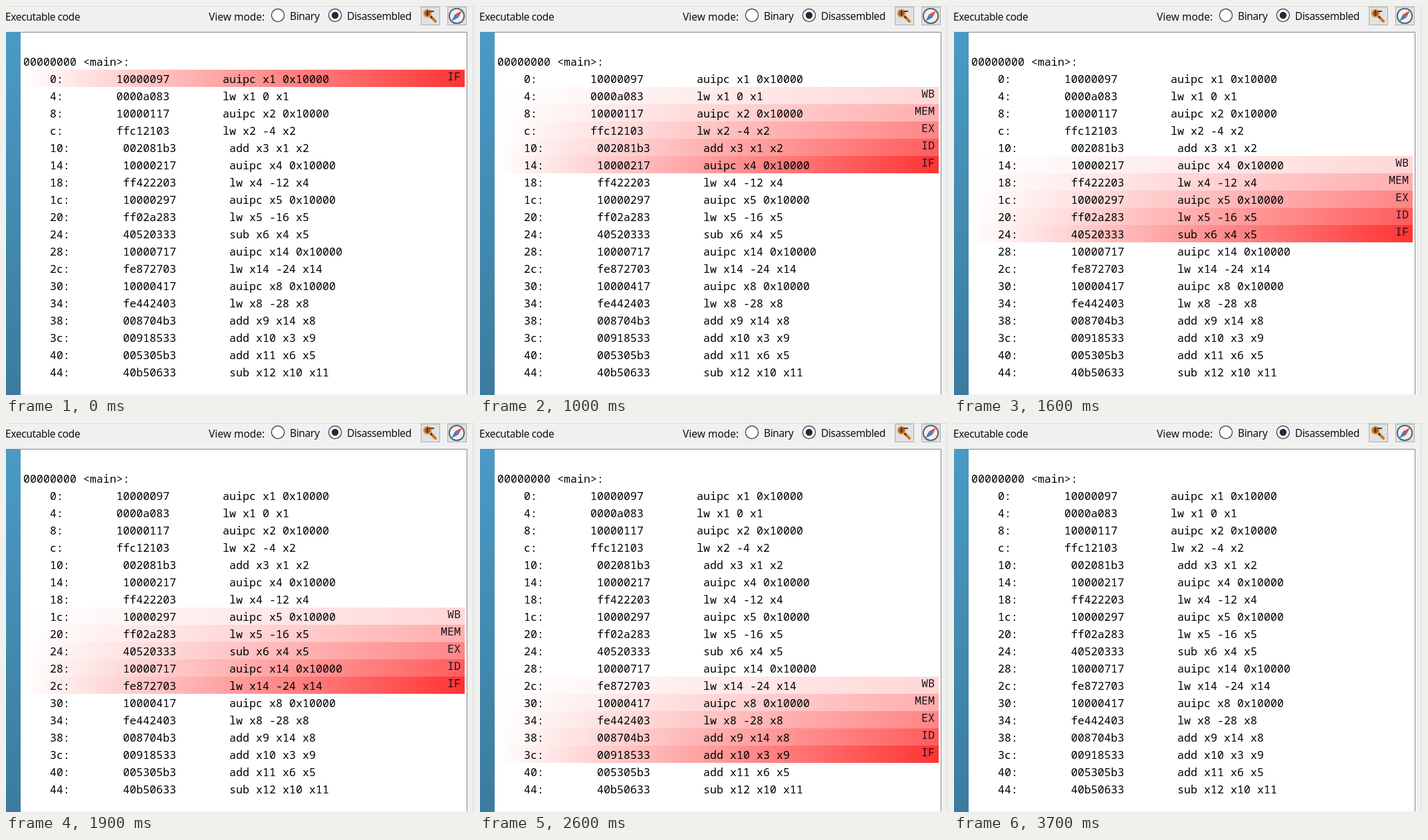
Recreate the animation shown at these times as an HTML page. Size 704x586 px, loop 4400 ms.

```html
<!DOCTYPE html>
<html lang="en">
<head>
<meta charset="utf-8">
<title>Pipeline stages</title>
<style>
  html, body { margin: 0; width: 100%; height: 100%; overflow: hidden; background: #f0f0f0; }
  svg { display: block; width: 704px; height: 586px; }
  text { white-space: pre; }
  .ui { font: 15.5px "Noto Sans", "Open Sans", sans-serif; letter-spacing: -0.37px; fill: #111; }
  .code { font: 16.667px "Noto Sans Mono", monospace; fill: #000; }
  .stage { text-anchor: end; fill: #1c1220; }
</style>
</head>
<body>
<svg viewBox="0 0 704 586">
  <defs>
    <linearGradient id="side" x2="0" y2="1">
      <stop stop-color="#4b9ac4"/><stop offset="1" stop-color="#3c7b9f"/>
    </linearGradient>
    <linearGradient id="glow" gradientUnits="userSpaceOnUse" x1="26" x2="690" y1="0" y2="0">
      <stop stop-color="#f00" stop-opacity="0"/><stop offset="1" stop-color="#f00"/>
    </linearGradient>
  </defs>

  <rect width="704" height="586" fill="#f0f0f0"/>
  <path d="M0 .5H704M702.5 0V586" stroke="#dcdcdc" fill="none"/>
  <rect y="39" width="22" height="547" fill="url(#side)"/>
  <rect x="22" y="39" width="672" height="546" fill="#fff"/>
  <path d="M22 39.5H693.5V585" stroke="#828790" fill="none"/>

  <g class="ui">
    <text x="-1" y="22">Executable code</text>
    <text x="305" y="22" style="letter-spacing:0">View mode:</text>
    <text x="427" y="21">Binary</text>
    <text x="513" y="21">Disassembled</text>
  </g>
  <g fill="#fff" stroke="#333" stroke-width="1.2">
    <circle cx="409" cy="14" r="9.6"/>
    <circle cx="495" cy="14" r="9.6"/>
  </g>
  <circle cx="495" cy="14" r="5.2" fill="#25283d"/>

  <g fill="#e1e1e1" stroke="#adadad">
    <rect x="624.5" y="1.5" width="28" height="27"/>
    <rect x="664.5" y="1.5" width="28" height="27"/>
  </g>
  <g stroke-linecap="round">
    <path d="M638 15L646 23" stroke="#c8742a" stroke-width="4"/>
    <path d="M637 14L640 17" stroke="#5a3018" stroke-width="3"/>
    <circle cx="634" cy="11" r="5.6" fill="#a45c2a" stroke="#e3a45c" stroke-width="2"/>
    <path d="M634 7V14M638 8H643" stroke="#5a3018" stroke-width="2"/>
  </g>
  <circle cx="678" cy="15" r="11.2" fill="#e9f0f6" stroke="#59616b" stroke-width="2"/>
  <path d="M686 7L680.5 17.5L675.5 12.5Z" fill="#d9503f"/>
  <path d="M670 23L680.5 17.5L675.5 12.5Z" fill="#3b7fbd"/>

  <g id="bands"></g>
  <g class="code" id="listing"><text x="26" y="90">00000000 &lt;main&gt;:</text></g>
</svg>
<script>
  const PROGRAM = [
    "10000097 auipc x1 0x10000", "0000a083 lw x1 0 x1",
    "10000117 auipc x2 0x10000", "ffc12103 lw x2 -4 x2",
    "002081b3 add x3 x1 x2",     "10000217 auipc x4 0x10000",
    "ff422203 lw x4 -12 x4",     "10000297 auipc x5 0x10000",
    "ff02a283 lw x5 -16 x5",     "40520333 sub x6 x4 x5",
    "10000717 auipc x14 0x10000", "fe872703 lw x14 -24 x14",
    "10000417 auipc x8 0x10000", "fe442403 lw x8 -28 x8",
    "008704b3 add x9 x14 x8",    "00918533 add x10 x3 x9",
    "005305b3 add x11 x6 x5",    "40b50633 sub x12 x10 x11"
  ];
  const STAGES = ["IF", "ID", "EX", "MEM", "WB"];
  // Moments of each clock tick, in tenths of a second
  const TICKS = [3, 5, 6, 8, 10, 12, 13, 15, 16, 18, 19, 21, 23, 25, 26, 28, 29, 31, 32, 34, 36, 37];
  const LOOP = 4400, TOP = 96, ROW = 26, LAST = PROGRAM.length - 1;

  const bands = document.getElementById("bands");
  const listing = document.getElementById("listing");

  function add(parent, tag, attrs, content = "") {
    const el = document.createElementNS("http://www.w3.org/2000/svg", tag);
    for (const key in attrs) el.setAttribute(key, attrs[key]);
    el.textContent = content;
    return parent.appendChild(el);
  }

  const rows = PROGRAM.map((line, i) => {
    const y = TOP + i * ROW, base = y + 20;
    const addr = (i * 4).toString(16);
    const shift = (addr.length - 1) * 10;
    add(listing, "text", { x: 66, y: base }, addr + ":");
    add(listing, "text", { x: 166 + shift, y: base }, line.slice(0, 8));
    add(listing, "text", { x: 326 + shift, y: base }, line.slice(9));
    return {
      band: add(bands, "rect", { x: 26, y, width: 664, height: ROW, fill: "url(#glow)" }),
      label: add(listing, "text", { x: 684, y: base - 4, class: "stage" })
    };
  });

  let shown = -1;
  function render(ms) {
    const step = TICKS.filter(t => t * 100 <= ms).length;
    if (step === shown) return;
    shown = step;
    // The newest instruction still in flight always has the strongest colour
    const newest = Math.min(step, LAST);
    rows.forEach(({ band, label }, i) => {
      const name = STAGES[step - i] || "";
      label.textContent = name;
      band.setAttribute("opacity", name ? 0.8 - 0.16 * (newest - i) : 0);
    });
  }

  function loop() {
    render(performance.now() % LOOP);
    requestAnimationFrame(loop);
  }
  loop();
</script>
</body>
</html>
```
